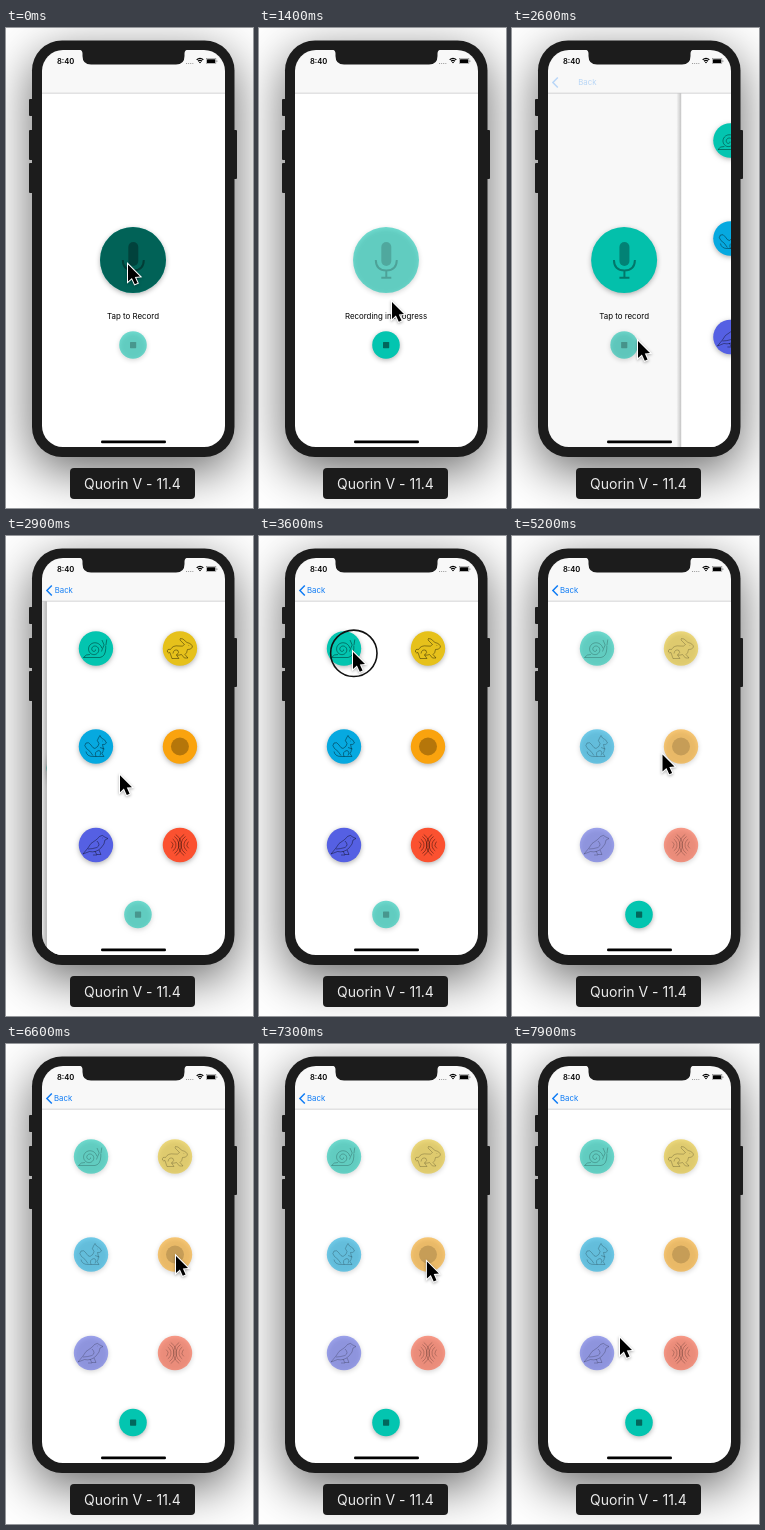
Animation of 247x480 px, one loop 8000 ms. Source, as an HTML page with a canvas:

```html
<!DOCTYPE html>
<html lang="en">
<head>
<meta charset="utf-8">
<title>Voice recorder</title>
<style>
  html, body { margin: 0; width: 100%; height: 100%; overflow: hidden; background: #fff; }
  canvas { display: block; width: 247px; height: 480px; }
</style>
</head>
<body>
<canvas id="stage"></canvas>
<script>
const W = 247, H = 480, LOOP = 8000, STEP = 100;
const SCREEN = { x: 36, y: 22, w: 183, h: 397 };
const TEAL = '#03c5b0', INK = 'rgba(0,0,0,.38)', SANS = 'Inter, Arial, sans-serif';
const canvas = document.getElementById('stage');
const ratio = window.devicePixelRatio || 1;
canvas.width = Math.round(W * ratio);
canvas.height = Math.round(H * ratio);
const ctx = canvas.getContext('2d');

// Times and tip positions of the pointer
const pointer = [
  [0, 122, 236.5], [1000, 122, 236.5], [1400, 133, 274], [1600, 126, 313],
  [2600, 126, 313], [3400, 94, 116], [3700, 94, 116], [4400, 125, 215],
  [5200, 150.5, 218.5], [6200, 172, 207], [6600, 170, 212],
  [7600, 167, 220], [7900, 108, 294], [8000, 106, 297]
];
const clicks = [[1500, 1600], [3500, 3700], [6900, 7100]];
const arrow = new Path2D('M0 0V17L3.9 13.4L6.8 19.8L9.6 18.6L6.8 12.4L12 12Z');

const snail = new Path2D('M-12.5 9H4Q9.5 8 9.8 0V-3M-12.5 9Q-10 5.5-6 6M6 -8.5L8.2 -3.5M10.8 -9L10 -3.5M8.2 -3.5Q6.5 0 5.5 3');
for (let a = 0; a <= 4 * Math.PI; a += 0.2) {
  const r = 1 + a * 0.52;
  const x = -1.5 + r * Math.cos(a), y = 1 + r * Math.sin(a);
  a ? snail.lineTo(x, y) : snail.moveTo(x, y);
}
const rabbit = new Path2D('M-9.5 1Q-13 0-12.5 3.5Q-11.5 5-10 4M-9.5 1Q-7-3.5-1-2.5Q3-1.5 4.5-4L0-8.5Q-.5-11 3-9.5L7-6Q12-5 12.5-1.5Q11 1.5 7.5 1Q7 5 5 6L8 9.5H4.5L1.5 6Q-1 7-3.5 6.5L-1 10H-8L-10 4M-7 5Q-6 0-2 2Q0 4-3.5 6.5M8.6-3H9.2');
const squirrel = new Path2D('M-3 9Q-6 4-9.5 2Q-12.5-1-10-3.5Q-7-5-5-1.5Q-3 2-1 2Q3 0 3-3Q0-6 2.5-8.5L4-11L5.5-8.5Q9.5-7 10.5-3.5Q9-1.5 6.5-2Q8.5 4 6 7L8 10H-3Q-9 10-10 5M4 1L8.5 2.5M0 10Q-2 5 3 4Q6 5 4 9M6.5-5.5H7');
const bird = new Path2D('M12-6.5L8.8-8Q6.5-11 3.5-8.5Q1.5-6 0-5Q-6-2-8 3L-13 9L-6.5 6.5Q0 8 5 3Q9-1 9-5ZM1-4Q5 0 1 2.5Q-4 4-8 4M-1 6L1 10H-3M3 4.8L5 9.5H1M6.5-7H7');
const waves = new Path2D();
for (const side of [-1, 1]) {
  for (const r of [4, 7, 10, 12.5]) {
    const mid = side < 0 ? 0 : Math.PI;
    waves.moveTo(side * 11 + r * Math.cos(mid - 1), r * Math.sin(mid - 1));
    waves.arc(side * 11, 0, r, mid - 1, mid + 1);
  }
}
const effects = [
  [85, 112.5, TEAL, snail], [169, 112.5, '#e6c11b', rabbit],
  [85, 210.5, '#06a9e0', squirrel], [169, 210.5, '#faa30e', null],
  [85, 309, '#5560e3', bird], [169, 309, '#fb5130', waves]
];

function box(x, y, w, h, r, color) {
  ctx.beginPath();
  ctx.roundRect(x, y, w, h, r);
  ctx.fillStyle = color;
  ctx.fill();
}

function text(str, x, y, size, color, align = 'center', weight = 400) {
  ctx.font = `${weight} ${size}px ${SANS}`;
  ctx.textAlign = align;
  ctx.fillStyle = color;
  ctx.fillText(str, x, y);
}

function shadow(alpha, blur, dy) {
  ctx.shadowColor = `rgba(0,0,0,${alpha})`;
  ctx.shadowBlur = blur * ratio;
  ctx.shadowOffsetY = dy * ratio;
}

function disc(x, y, r, color, enabled, drawIcon) {
  ctx.save();
  ctx.translate(x, y);
  ctx.globalAlpha = enabled ? 1 : 0.55;
  ctx.save();
  shadow(0.3, 5, 1.5);
  ctx.beginPath();
  ctx.arc(0, 0, r, 0, 2 * Math.PI);
  ctx.fillStyle = color;
  ctx.fill();
  ctx.restore();
  drawIcon();
  ctx.restore();
}

function micIcon() {
  box(-4.7, -18, 10, 24, 5, 'rgba(0,0,0,.32)');
  ctx.strokeStyle = INK;
  ctx.lineWidth = 2;
  ctx.stroke(new Path2D('M-10.2 0Q-10 10.5 .3 10.5Q10.6 10.5 10.8 0M.3 10.5V17.5M-4.7 17.7H5.3'));
}

function stopButton(y, enabled) {
  disc(127, y, 13.8, TEAL, enabled, () => box(-3, -3, 6.2, 6.2, 0.6, 'rgba(0,0,0,.48)'));
}

function effectIcon(path) {
  if (!path) {
    ctx.beginPath();
    ctx.arc(0, 0, 9, 0, 2 * Math.PI);
    ctx.fillStyle = 'rgba(0,0,0,.28)';
    ctx.fill();
    return;
  }
  ctx.strokeStyle = 'rgba(0,0,0,.5)';
  ctx.lineWidth = 0.8;
  ctx.lineJoin = 'round';
  ctx.stroke(path);
}

function recordPage(t) {
  const recording = t >= 1000 && t < 1600;
  const label = recording ? 'Recording in Progress' : t < 1000 ? 'Tap to Record' : 'Tap to record';
  box(SCREEN.x, 65, SCREEN.w, 354, 0, '#fff');
  disc(127, 232, 33, TEAL, !recording, micIcon);
  if (t < 400) {
    ctx.beginPath();
    ctx.arc(127, 232, 33, 0, 2 * Math.PI);
    ctx.fillStyle = 'rgba(0,0,0,.5)';
    ctx.fill();
  }
  text(label, 127, 291, 7.9, '#000');
  stopButton(317, recording);
}

function effectsPage(t) {
  const playing = (t >= 3700 && t < 6800) || t >= 7100;
  box(SCREEN.x, 65, SCREEN.w, 354, 0, '#fff');
  for (const [x, y, color, path] of effects) {
    disc(x, y, 17.2, color, !playing, () => effectIcon(path));
  }
  stopButton(378.5, playing);
}

function pages(t, p) {
  if (p < 1) {
    ctx.save();
    ctx.translate(-0.3 * SCREEN.w * p, 0);
    recordPage(t);
    ctx.restore();
    box(SCREEN.x, 65, SCREEN.w, 354, 0, `rgba(0,0,0,${0.1 * p})`);
  }
  if (p > 0) {
    const dx = SCREEN.w * (1 - p), edge = SCREEN.x + dx;
    const fade = ctx.createLinearGradient(edge - 5, 0, edge, 0);
    fade.addColorStop(0, 'rgba(0,0,0,0)');
    fade.addColorStop(1, 'rgba(0,0,0,.22)');
    box(edge - 5, 65, 5, 354, 0, fade);
    ctx.save();
    ctx.translate(dx, 0);
    effectsPage(t);
    ctx.restore();
  }
}

function navBar(p) {
  box(SCREEN.x, SCREEN.y, SCREEN.w, 43, 0, '#f8f8f8');
  box(SCREEN.x, 64.7, SCREEN.w, 0.7, 0, '#c6c6c8');
  ctx.save();
  ctx.globalAlpha = p;
  text('Back', 48 + 25 * (1 - p), 57.2, 7.8, '#0f7cf5', 'left');
  ctx.strokeStyle = '#0f7cf5';
  ctx.lineWidth = 1.5;
  ctx.stroke(new Path2D('M45.8 49.4L40.9 54.4L45.8 59.4'));
  ctx.restore();
}

function statusBar() {
  text('8:40', 51, 36, 7.6, '#000', 'left', 600);
  for (let i = 0; i < 4; i++) box(180 + i * 2.1, 35, 1.1, 1.1, 0.5, '#888');
  ctx.strokeStyle = '#000';
  ctx.lineWidth = 1.2;
  for (const r of [1, 3, 5]) {
    ctx.beginPath();
    ctx.arc(194, 35.5, r, -2.3, -0.84);
    ctx.stroke();
  }
  ctx.lineWidth = 0.5;
  ctx.strokeStyle = '#777';
  ctx.strokeRect(200.3, 30.6, 9.6, 5);
  box(201, 31.3, 8.2, 3.6, 0.5, '#000');
  box(210.5, 32.3, 0.8, 1.7, 0.3, '#777');
}

function phoneBody() {
  ctx.save();
  shadow(0.6, 50, 14);
  box(26, 12.5, 202.5, 416.5, 30, '#1c1c1c');
  ctx.restore();
  for (const [x, y, h] of [[23, 71, 17], [23, 102, 30], [23, 135, 30], [227, 102, 49]]) {
    box(x, y, 4, h, 1, '#1c1c1c');
  }
  box(64, 440, 125, 31, 4, '#1b1b1b');
  text('Quorin V - 11.4', 126.5, 461.3, 14, '#ececec');
}

function notch() {
  ctx.fillStyle = '#1c1c1c';
  ctx.fill(new Path2D('M73 21.5Q76.5 22 76.5 25.5V28Q76.5 36.5 85 36.5H170Q178.5 36.5 178.5 28V25.5Q178.5 22 182 21.5Z'));
}

function drawPointer(t) {
  const i = pointer.findIndex(k => k[0] > t);
  const [t0, x0, y0] = pointer[i - 1], [t1, x1, y1] = pointer[i];
  const u = (t - t0) / (t1 - t0);
  ctx.save();
  ctx.translate(x0 + (x1 - x0) * u, y0 + (y1 - y0) * u);
  if (clicks.some(([a, b]) => t >= a && t < b)) {
    ctx.beginPath();
    ctx.arc(0.8, 1.3, 23.2, 0, 2 * Math.PI);
    ctx.strokeStyle = '#111';
    ctx.lineWidth = 1.6;
    ctx.stroke();
  }
  ctx.save();
  shadow(0.35, 3, 1);
  ctx.strokeStyle = '#fff';
  ctx.lineWidth = 2;
  ctx.lineJoin = 'miter';
  ctx.stroke(arrow);
  ctx.restore();
  ctx.fillStyle = '#000';
  ctx.fill(arrow);
  ctx.restore();
}

function draw(t) {
  const u = Math.min(1, Math.max(0, (t - 2550) / 500));
  const p = 1 - (1 - u) ** 3;
  ctx.setTransform(ratio, 0, 0, ratio, 0, 0);
  box(0, 0, W, H, 0, '#fff');
  phoneBody();
  ctx.save();
  ctx.beginPath();
  ctx.roundRect(SCREEN.x, SCREEN.y, SCREEN.w, SCREEN.h, 21);
  ctx.clip();
  pages(t, p);
  navBar(p);
  statusBar();
  box(95, 412.6, 65, 2.6, 1.3, '#000');
  ctx.restore();
  notch();
  drawPointer(t);
}

const start = performance.now();
let last = -1;
function tick() {
  const t = Math.floor(((performance.now() - start) % LOOP) / STEP) * STEP;
  if (t !== last) draw(last = t);
  requestAnimationFrame(tick);
}
tick();
</script>
</body>
</html>
```
